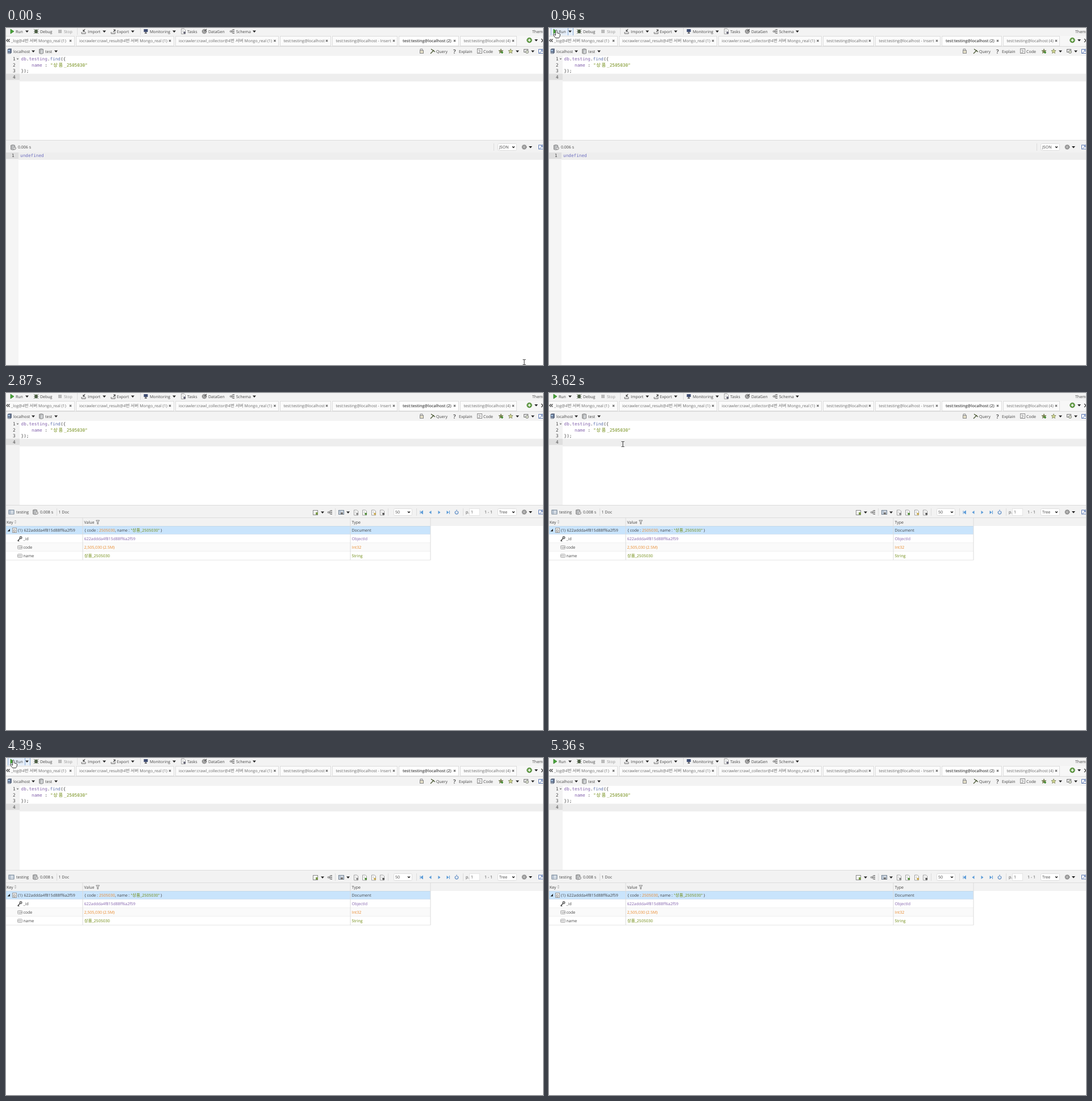
Animation, 945 px wide and 593 px high, one loop 5.69 s. Source, as an HTML page:

```html
<!DOCTYPE html>
<html lang="ko">
<head>
<meta charset="utf-8">
<style>
html, body { margin: 0; width: 100%; height: 100%; overflow: hidden; background: #fff; }
svg { display: block; width: 100vw; height: 100vh; }
text { font: 7px "Open Sans", "Noto Sans CJK KR", "Noto Sans CJK", sans-serif; fill: #444; white-space: pre; text-rendering: geometricPrecision; }
.ko { font-size: 7.6px; }
.tab { font-size: 7.05px; fill: #6a6a6a; }
.active { font-weight: 600; fill: #444; }
.bold { font-weight: 600; }
.ago { font-size: 7.2px; font-weight: 600; fill: #999; }
.dim { fill: #929292; }
.code, .code .ko { font: 7.7px "DejaVu Sans Mono", "Noto Sans CJK KR", monospace; }
.code .ko { font-size: 8.2px; letter-spacing: 1.7px; }
</style>
</head>
<body>
<svg id="stage" viewBox="0 0 945 593" preserveAspectRatio="none"></svg>
<script>
const LOOP = 5690;
const stage = document.getElementById('stage');
const PURPLE = '#8463ad', ORANGE = '#e98a2d', GREEN = '#6f8a10', BLUE = '#4a7fc0', INK = '#555', LINE = '#dcdcdc';
let layer = stage;

function add(tag, attrs = {}, parent = layer) {
  const node = document.createElementNS('http://www.w3.org/2000/svg', tag);
  for (const key in attrs) node.setAttribute(key, attrs[key]);
  return parent.appendChild(node);
}
function group(draw) {
  const outer = layer, node = add('g');
  layer = node;
  draw();
  layer = outer;
  return node;
}
const rect = (x, y, width, height, fill, more) => add('rect', { x, y, width, height, fill, ...more });
const frame = (x, y, w, h, fill, stroke, rx = 0) => rect(x + .5, y + .5, w - 1, h - 1, fill, { stroke, rx });
const path = (d, fill = 'none', stroke = 'none', width = 1) => add('path', { d, fill, stroke, 'stroke-width': width });
const dot = (cx, cy, r, fill, stroke = 'none') => add('circle', { cx, cy, r, fill, stroke, 'stroke-width': .8 });
const vline = (x, y, h) => rect(x, y, 1, h, LINE);

// Parts are plain strings or spans; y is the middle of the line.
function text(x, y, parts, cls = '', fill) {
  const node = add('text', { x, y: y + 2.6, class: cls });
  if (fill) node.style.fill = fill;
  for (const part of [].concat(parts)) {
    const { str, attrs } = typeof part === 'string' ? span(part) : part;
    const run = add('tspan', attrs, node);
    for (const piece of str.split(/([가-힣]+)/)) {
      if (!piece) continue;
      const hangul = /[가-힣]/.test(piece);
      add('tspan', hangul ? { class: 'ko' } : {}, run).textContent = piece;
    }
  }
  return node;
}
function span(str, attrs = {}) { return { str, attrs }; }
const tint = (str, fill) => span(str, { style: `fill:${fill}` });

// Icons, each placed by its centre
const caret = (x, y) => path(`M${x - 3} ${y - 1.5}h6l-3 3.5z`, '#222');
const chevron = (x, y) => path(`M${x - 2} ${y - 1}l2 2 2-2`, 'none', '#222', 1.3);
const cross = (x, y) => path(`M${x - 1.6} ${y - 1.6}l3.2 3.2m0-3.2l-3.2 3.2`, 'none', '#555', 1.1);
const plus = (x, y, r, color) => path(`M${x - r} ${y}h${2 * r}m${-r} ${-r}v${2 * r}`, 'none', color, 1.4);
function cylinder(x, y) {
  path(`M${x - 3.5} ${y - 3.5}q3.5-2 7 0v7q-3.5 2-7 0z`, '#cfd2d5', '#777', .8);
  path(`M${x - 1.8} ${y - 2.5}v6.5`, 'none', '#999', 1.2);
  path(`M${x - 3.5} ${y - 3.5}q3.5 2 7 0`, 'none', '#888', .7);
}
function host(x, y) {
  path(`M${x - 3} ${y - 3.5}l2-1h4.5v7l-2 1.5h-4.5z`, '#61708a', '#46536a', .6);
  rect(x - 2.5, y - 2.5, 3.5, 2.5, '#a9c6e3');
  path(`M${x - 4} ${y + 3}h5`, 'none', '#c9ced6', 1.2);
}
function page(x, y, badge) {
  path(`M${x - 3.5} ${y - 4.5}h5l2 2v7h-7z`, '#fff', '#888', .8);
  path(`M${x - 2} ${y - 1.5}h3m-3 2h3`, 'none', '#aaa', .7);
  if (badge) dot(x + 2.2, y + 2.2, 2, badge);
}
function grid(x, y) {
  frame(x - 5, y - 4, 10, 8, '#f8fbff', '#67788a');
  path(`M${x - 5} ${y - 1.5}h10m-10 2.5h10m-7-5v8`, 'none', '#7c91a8', .7);
}
function timer(x, y) {
  cylinder(x - 1, y);
  dot(x + 2, y + 1.5, 2.4, '#fff', '#666');
  path(`M${x + 2} ${y}v1.7h1.3`, 'none', '#555', .6);
}
function tree(x, y) {
  path(`M${x - 2} ${y}h2v-3h2m-2 3v3h2m-2-3h2`, 'none', '#666', .8);
  dot(x - 2.5, y, 1.4, '#ddd', '#666');
  for (const dy of [-3, 0, 3]) rect(x + 1.5, y + dy - 1, 2.4, 2, '#888');
}
function star(x, y, fill) {
  let d = 'M';
  for (let i = 0; i < 10; i++) {
    const r = i % 2 ? 1.9 : 4.3, a = i * Math.PI / 5;
    d += `${x + r * Math.sin(a)} ${y - r * Math.cos(a)} `;
  }
  path(d + 'z', fill, '#6d744e', .7);
}
function gear(x, y) {
  add('circle', { cx: x, cy: y, r: 3.6, fill: 'none', stroke: '#777', 'stroke-width': 1.5, 'stroke-dasharray': '1.6 .66' });
  dot(x, y, 2.6, '#bbb', '#777');
}
function popout(x, y) {
  frame(x - 4, y - 4, 9, 8, '#fff', '#5b78b4');
  path(`M${x - 2} ${y + 3}l5-5m-3 0h3v3`, 'none', '#5b78b4', 1);
}
function arrowBox(x, y, up) {
  path(`M${x - 4} ${y + 1}v3h7v-3`, '#ddd', '#666', .9);
  path(up ? `M${x} ${y + 1}l3-4m-3 0h3v3` : `M${x + 2} ${y - 4}l-3 4m0-3v3h3`, 'none', '#444', 1.2);
}
function select(x, w, label) {
  frame(x, 203, w, 13, '#fff', '#dedede', 2);
  text(x + 3, 209.5, label);
  chevron(x + w - 6, 209.5);
}
const hoverBox = (x, y, w, h) => frame(x, y, w, h, '#e6effa', '#b0c7e6', 1);

// Main toolbar
rect(0, 0, 945, 49, '#f3f3f3');
const runHover = group(() => {
  rect(3, 0, 39, 13, '#e6effa');
  for (const x of [3, 33, 42]) rect(x, 0, 1, 13, '#8faed6');
});
path('M8 2l6 4-6 4z', '#49a23a', '#2f7d25', .7);
text(17, 6, 'Run'); caret(37, 6);
add('ellipse', { cx: 53, cy: 6, rx: 2.6, ry: 3.6, fill: '#4c6640' });
path('M49 2l8 8m0-8l-8 8M49 6h8', 'none', '#4c5648', .9);
text(60, 6, 'Debug');
rect(92, 3, 6, 6, '#bbb'); text(102, 6, 'Stop', 'dim');
vline(125, 0, 12);
arrowBox(137, 6, false); text(144, 6, 'Import'); caret(173, 6);
arrowBox(189, 6, true); text(195, 6, 'Export'); caret(223, 6);
vline(236, 0, 12);
rect(242.5, 2, 7, 5, '#3f4d72'); path('M244 9h4m-2-2v2', 'none', INK, 1.4);
text(253, 6, 'Monitoring'); caret(296, 6);
page(312, 6, '#667'); text(319, 6, 'Tasks');
gear(349, 6); path('M349 6l4-4', 'none', INK, 1.5); text(356, 6, 'DataGen');
tree(398, 6); text(405, 6, 'Schema'); caret(437, 6);
text(926, 6, 'Theme');

// Tabs
function tab(x, w, label, labelX, crossX) {
  frame(x, 14, w, 18, '#fbfbfb', LINE);
  text(labelX, 22, label, 'tab');
  cross(crossX, 22.5);
}
rect(0, 14, 945, 17, '#f7f7f7');
tab(-3, 124, '_log@4번 서버 Mongo_real (1)', 9, 113.5);
const firstTabHover = group(() => {
  frame(-3, 14, 124, 18, '#dedede', '#d0d0d0');
  text(9, 22, '_log@4번 서버 Mongo_real (1)', 'tab');
  cross(113.5, 22.5);
});
tab(123, 173, 'iocrawler:crawl_result@4번 서버 Mongo_real (1)', 129, 288.5);
tab(298, 182, 'iocrawler:crawl_collector@4번 서버 Mongo_real (1)', 304, 473);
tab(482, 90, 'test:testing@localhost', 488.5, 564.5);
tab(574, 115, 'test:testing@localhost - Insert', 580.5, 682.5);
const activeTab = frame(691, 14, 106, 18, '#fff', LINE);
const activeLabel = group(() => {
  text(698, 22, 'test:testing@localhost (2)', 'tab active');
  cross(789.5, 22.5);
});
const lastTab = group(() => tab(799, 100, 'test:testing@localhost (4)', 805.5, 892.5));
const spinner = path('M702 19a3 3 0 1 1-3 3', 'none', '#777', 1.1);
path('M3.5 19.5l-2.5 2.5 2.5 2.5m3-5l-2.5 2.5 2.5 2.5', 'none', '#333', 1.1);
dot(921, 21.5, 4.3, '#5f9d3f', '#4a7a36'); plus(921, 21.5, 2.4, '#fff');
caret(933, 21.5);
path('M942 19l3 3-3 3', 'none', '#333', 1.2);
rect(0, 32, 945, 1, LINE);

// Connection bar
const hostHover = group(() => hoverBox(0, 34, 54, 13));
const dbHover = group(() => hoverBox(56, 34, 37, 13));
host(6, 41); text(13, 41, 'localhost'); caret(48, 41);
cylinder(62, 41); text(69, 41, 'test'); caret(88, 41);
frame(728, 39, 7, 6, '#e4dfc8', '#888'); path('M729 39v-2h4v2', 'none', '#888', 1);
path('M747 45l6-6m-5-2l7 5', 'none', '#4d5a38', 1.4); text(757, 41, 'Query');
text(787, 42, '?', 'bold').style.fontSize = '10px'; text(797, 41, 'Explain');
frame(829, 36, 9, 9, '#fff', '#888'); path('M831 39h4m-3 2h4m-5 2h3', 'none', '#777', .8);
text(840, 41, 'Code');
star(871, 41, '#7b8a52'); plus(873, 43, 2, '#3f8d2f');
star(888, 41, '#d3d88f'); caret(900, 41);
frame(911, 37, 8, 6, '#e9e9e9', '#777'); dot(917, 42, 2.6, '#d5dbc9', '#777'); caret(927, 41);
popout(941, 41);

// Editor
rect(0, 49, 945, 149, '#fff');
rect(0, 49, 24, 149, '#f3f3f3');
rect(24, 80.5, 921, 13.5, '#eee');
rect(0, 80.5, 24, 11, '#dfdfdf');
[54.5, 65, 75.5, 86].forEach((y, i) => text(12, y, String(i + 1), 'code'));
path('M18.5 53.5h4l-2 2.5z', '#777');
text(26.5, 54.5, [tint('db', PURPLE), '.', tint('testing', PURPLE), '.', tint('find', '#5f72b0'), '({'], 'code');
text(45, 65, [tint('name', PURPLE), ' :'], 'code');
text(78, 65, '"', 'code', GREEN);
text(83.3, 65, '상품', 'code', GREEN);
text(102, 65, '_2505030"', 'code', GREEN);
text(26.5, 75.5, '});', 'code');
rect(0, 197, 945, 1, LINE);

// Results
rect(0, 198, 945, 395, '#f2f2f2');
function resultCorner(mode) {
  select(865, 34, mode);
  gear(912, 209.5); caret(923, 209.5); popout(941, 209.5);
}
const undefinedView = group(() => {
  rect(0, 219, 945, 374, '#fff');
  rect(0, 219, 22, 374, '#f5f5f5');
  rect(22, 219, 923, 13, '#eee');
  rect(0, 219, 22, 11.5, '#dfdfdf');
  text(10, 224.5, '1', 'code');
  text(25, 224.5, 'undefined', 'code', '#6f70c0');
  timer(13, 210); text(21, 209.5, '0.006 s');
  vline(858, 203, 13);
  resultCorner('JSON');
});
const treeView = group(() => {
  grid(9.5, 209.5); text(18, 209.5, 'testing');
  timer(52, 209.5); text(60, 209.5, '0.008 s');
  text(92.5, 209.5, '1 Doc');
  for (const x of [89, 579, 672, 722, 804]) vline(x, 203, 13);
  frame(540, 206, 9, 9, '#fff', '#888'); rect(545, 210, 4, 4, '#7c9a4a'); caret(557, 210);
  tree(570, 210);
  grid(590, 210); rect(589, 210, 4, 4, '#777'); caret(602, 210);
  page(616, 210.5, '#888'); page(631, 210.5, '#4d8b35'); page(647, 210.5, '#c9a94f'); page(662, 210.5, '#555');
  select(682, 33, '50');
  path('M729 207v6m4.5-6l-4 3 4 3z', '#5b9bd8', '#5b9bd8', .8);
  path('M748.5 207l-4 3 4 3zM760.5 207l4 3-4 3zM775.5 207l4 3-4 3z', '#5b9bd8');
  path('M780.5 207v6', 'none', '#5b9bd8', 1);
  path('M791.5 208a2.8 2.8 0 1 0 3 0M793 205.5v3', 'none', BLUE, 1.1);
  text(809, 209.5, 'p.');
  frame(815, 203, 19, 13, '#fff', '#e4e4e4'); text(818, 209.5, '1');
  text(842, 209.5, '1 - 1');
  resultCorner('Tree');

  rect(0, 219, 945, 374, '#fff');
  rect(0, 219, 945, 15, '#f2f2f2');
  rect(0, 219, 945, 1, LINE);
  text(1, 227, 'Key'); path('M14.5 226l2-2.5 2 2.5zm0 1.5l2 2.5 2-2.5z', '#bbb');
  text(137.5, 227, 'Value'); path('M158.5 224h6l-2.2 3v3.5h-1.6v-3.5z', '#ddd', '#777', .8);
  text(608.5, 227, 'Type');
  ['#c9e4fc', '#fff', '#fafafa', '#fff'].forEach((fill, i) => {
    rect(0, 234 + i * 15, 747, 15, fill);
    rect(0, 248.5 + i * 15, 747, 1, '#e6e6e6');
  });
  rect(0, 234, 747, 1, '#c3d9ec');
  for (const x of [134.5, 605.5, 746.5]) vline(x, 219, 75);

  path('M2.5 243.5h4.5v-4.5z', '#222');
  frame(11, 237, 8, 9, '#eee', '#999'); text(12.5, 241, '{}').style.fontSize = '6px';
  text(21, 241.5, '(1)');
  text(31.5, 241.5, '622addda4f815d88ff6a2f59');
  text(138, 241.5, ['{ code : ', tint('2505030', ORANGE), ', name : ', tint('"상품_2505030"', GREEN), ' }']);
  text(608.5, 241.5, 'Document');
  dot(26, 254.5, 2.2, '#aaa', '#444'); path('M24.5 256l-4 4.5m1-1l1.5 1.5', 'none', '#444', 1.4);
  text(30.5, 256.5, '_id');
  text(137.5, 256.5, '622addda4f815d88ff6a2f59', '', PURPLE);
  text(608.5, 256.5, 'ObjectId', '', PURPLE);
  for (const y of [271.5, 286.5]) frame(20, y - 3.5, 9, 7, '#f4f4f4', '#aaa', 1);
  text(21.3, 270.3, '123').style.fontSize = '4px';
  path('M22 285.5v2m2-2v2m2-2v2', 'none', '#777', .8);
  text(30.5, 271.5, 'code');
  text(137.5, 271.5, '2,505,030 (2.5M)', '', ORANGE);
  text(608.5, 271.5, 'Int32', '', ORANGE);
  text(30.5, 286.5, 'name');
  text(137.5, 286.5, '상품_2505030', '', GREEN);
  text(608.5, 286.5, 'String', '', GREEN);
});

// Drop-down menus
function menuPanel(x, w, h, ruleX) {
  rect(x + 1.5, 50.5, w, h, '#000', { opacity: .12 });
  frame(x, 49, w, h, '#fafafa', '#ccc');
  rect(ruleX, 50, 1, h - 2, '#e6e6e6');
}
const dbMenu = group(() => {
  menuPanel(55, 119, 113, 69);
  cylinder(62, 57); text(73, 57, 'Prompt for User Input ...');
  rect(70, 65, 102, 1, LINE);
  ['admin', 'config', 'crawl', 'index', 'iocrawler', 'iostudio', 'local'].forEach((name, i) => {
    const y = 74.7 + i * 13.15;
    cylinder(62, y);
    text(73, y, name, /admin|config|local/.test(name) ? 'dim' : '');
  });
});
const hostMenu = group(() => {
  menuPanel(-1, 207, 178, 13);
  host(6, 57); text(17, 57, 'Connect ...');
  path('M3 73l7-6-2 5-4 2z', '#e8e2cf', '#888', .8); text(17, 70, 'Connect From URI ...');
  rect(14, 78, 190, 1, LINE);
  [
    ['localhost (Connected)', '31 MINUTES'], ['5번 서버 Mongodb (Connected)', 'A DAY'],
    ['4번 서버 Mongo_real', 'A DAY'], ['남섬여행본부) 검색서버', '23 DAYS'],
    ['Local) QX-TOLB', 'A MONTH'], ['Localhost_Brun_Pelovak', '2 MONTHS'],
    ['4번 서버 Mongo_?', '3 MONTHS'], ['QZT) 모람부', 'A YEAR'],
    ['3번 서버 Mongo', 'A YEAR'], ['두루자료공동협의회_사업관리시스템', '2 YEARS'],
    ['들솔원) 개발서버', '2 YEARS']
  ].forEach(([name, age], i) => {
    const y = 88 + i * 13.1;
    host(6, y);
    text(17, y, [span(name, i ? {} : { class: 'bold' }), span(age + ' AGO', { class: 'ago', dx: 3 })]);
  });
});

// Pointers, hot spot at 0,0
const pointers = {
  hand: group(() => path('M-1.4 0q1.4-2 2.6 0v4.2l4 1.1q1.6.5 1.4 2.2l-.9 3.5-1.4 2h-5.6l-4-5q-.7-1.6.9-1.4l3 1.8z', '#fff', '#222', .9)),
  beam: group(() => path('M-2.5-4.5h2l.5.5.5-.5h2M0-4v8M-2.5 4.5h2l.5-.5.5.5h2', 'none', '#333', 1)),
  arrow: group(() => path('M0 0v10l2.4-2.2 1.6 3.7 1.5-.6-1.6-3.6h3.2z', '#fff', '#222', .8))
};

// [time, x, y]; without a place the pointer is off the stage
const track = [
  [0, 912, 588], [70, 760, 480], [140, 500, 300], [210, 230, 130], [270, 74, 40], [340, 71, 37],
  [470, 60, 34], [540, 36, 25], [610, 13, 16], [680, 13, 10], [750, 13, 5], [820, 13, 4.5],
  [2520, 60, 50], [2590, 180, 140], [2660, 380, 260], [2730, 640, 430], [2800, 874, 582], [2870],
  [3270, 834, 547], [3340, 700, 450], [3410, 540, 330], [3480, 380, 230], [3550, 240, 150],
  [3620, 130, 90], [3690, 60, 55], [3760, 30, 40], [3830, 28, 36], [3900, 28, 30], [3970, 28, 24],
  [4040, 20, 12], [4110, 13, 4.5], [4660, 74, 40], [4730, 117, 80], [4800, 240, 170], [4870, 400, 280],
  [4940, 560, 385], [5010, 700, 470], [5080, 800, 530], [5150, 870, 570], [5220, 908, 589],
  [5290, 908, 591], [5360]
];
const visibleDuring = [
  [undefinedView, [0, 1980]],
  [treeView, [1980, 4660], [4800, LOOP]],
  [runHover, [680, 2520], [4040, 4660]],
  [firstTabHover, [540, 680], [3900, 4040]],
  [dbHover, [270, 960], [4660, 4800]],
  [hostHover, [3760, 4320]],
  [dbMenu, [340, 960]],
  [hostMenu, [3830, 4320]],
  [spinner, [1500, 2050], [4520, 4660]]
];
const within = (t, spans) => spans.some(([from, to]) => t >= from && t < to);
const show = (node, on) => node.setAttribute('visibility', on ? 'visible' : 'hidden');

function render(t) {
  for (const [node, ...spans] of visibleDuring) show(node, within(t, spans));

  const busy = within(t, [[1500, 2050], [4520, 4660]]);
  const shift = `translate(${busy ? 10.5 : 0} 0)`;
  activeLabel.setAttribute('transform', shift);
  lastTab.setAttribute('transform', shift);
  activeTab.setAttribute('width', busy ? 115.5 : 105);
  spinner.setAttribute('transform', `rotate(${Math.floor(t / 135) * 75 % 360} 702 22)`);

  const [, x, y] = track.findLast(step => step[0] <= t);
  const overText = y < 198 || t < 1980;
  const kind = x === undefined ? '' : y < 48 ? 'hand' : overText ? 'beam' : 'arrow';
  for (const name in pointers) {
    show(pointers[name], name === kind);
    if (name === kind) pointers[name].setAttribute('transform', `translate(${x} ${y})`);
  }
}

const start = performance.now();
function tick() {
  render((performance.now() - start) % LOOP);
  requestAnimationFrame(tick);
}
tick();
</script>
</body>
</html>
```
